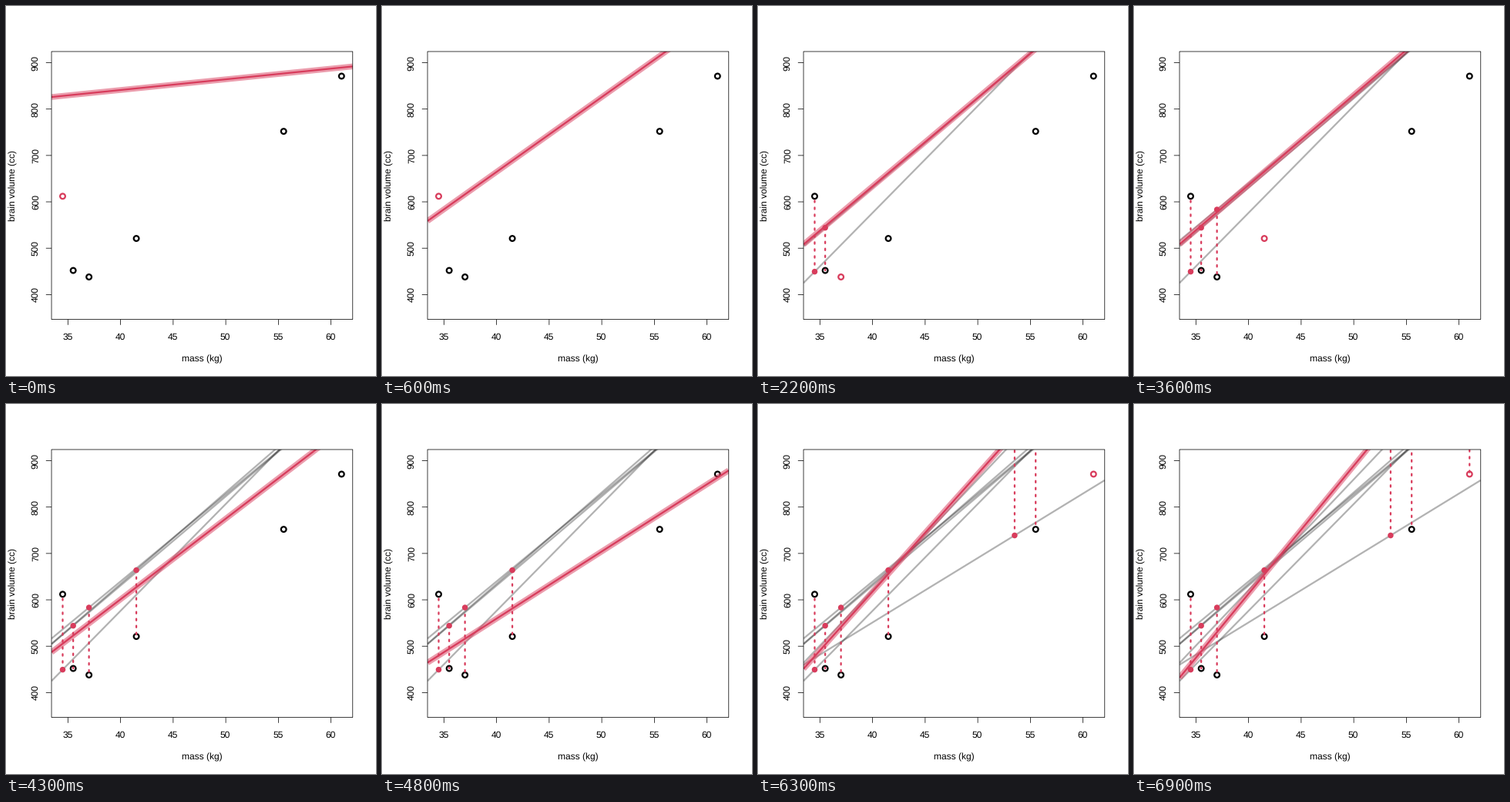
Write a matplotlib script that moves like this. It is 480 by 480 pixels and loops after 7 s.

```python
import matplotlib.pyplot as plt
from matplotlib.animation import FuncAnimation
from matplotlib.patches import Circle, Rectangle

plt.rcParams["font.family"] = "Liberation Sans"
plt.rcParams["text.hinting"] = "none"

SIZE, DPI = 480, 72            # at 72 dpi one point is one pixel
STAGE = 10                     # frames spent on each left-out observation
LEFT, RIGHT, TOP, BOTTOM = 59.04, 449.76, 59.04, 406.56
X0, X1 = 33.44, 62.06
Y0, Y1 = 346.5, 924.1
RED = "#D83C5C"
THIN, BOLD, WIDE = 0.75, 2.25, 7.5
DASH = 4 * BOLD                # length of one dash and its gap

MASS = [34.5, 35.5, 37, 41.5, 53.5, 55.5, 61]
BRAIN = [612, 452, 438, 521, 1350, 752, 871]

# (value at the left edge, slope): a flat start, then one fit per left-out point
FITS = [(870.5, 0), (425, 23.05), (504.5, 19.24), (516.5, 18.78),
        (505, 19.72), (460, 13.9), (464, 23.9), (432, 27.6)]


def px(x):
    return LEFT + (x - X0) / (X1 - X0) * (RIGHT - LEFT)


def py(y):
    return BOTTOM - (y - Y0) / (Y1 - Y0) * (BOTTOM - TOP)


def value(fit, x):
    return fit[0] + fit[1] * (x - X0)


def ends(fit):
    return [py(value(fit, X0)), py(value(fit, X1))]


fig = plt.figure(figsize=(SIZE / DPI, SIZE / DPI), dpi=DPI, facecolor="white")
ax = fig.add_axes([0, 0, 1, 1])
ax.set_xlim(0, SIZE)
ax.set_ylim(SIZE, 0)
ax.axis("off")

frame_box = Rectangle((LEFT, TOP), RIGHT - LEFT, BOTTOM - TOP, fill=False,
                      ec="black", lw=THIN, snap=False, zorder=8)
ax.add_patch(frame_box)


def clipped(artist):
    artist.set_clip_path(frame_box)
    return artist


def data_line(xs, ys, **style):
    line, = ax.plot(xs, ys, snap=False, **style)
    return clipped(line)


def fit_line(fit, **style):
    return data_line([LEFT, RIGHT], ends(fit), solid_capstyle="butt", **style)


def gap_line(x, guess, y):
    # dashes run from the guess; one above the stage moves in by whole dashes
    start = max(py(guess), py(guess) % DASH)
    return data_line([px(x)] * 2, [start, py(y)], color=RED, lw=BOLD,
                     ls=(0, (1, 3)), dash_capstyle="round", zorder=3)


def disc(x, y, r, **style):
    return clipped(ax.add_patch(Circle((px(x), py(y)), r, snap=False, **style)))


def tick(xs, ys):
    ax.plot(xs, ys, color="black", lw=THIN, snap=False, solid_capstyle="butt")


def label(x, y, text, rotation=0):
    ax.text(x, y, text, size=12, rotation=rotation, rotation_mode="anchor",
            ha="center", va="baseline")


def draw_axes():
    for x in range(35, 61, 5):
        tick([px(x)] * 2, [BOTTOM, BOTTOM + 7.2])
        label(px(x) - 0.5, 433, str(x))
    for y in range(400, 901, 100):
        tick([LEFT - 7.2, LEFT], [py(y)] * 2)
        label(41.8, py(y), str(y), 90)
    label((LEFT + RIGHT) / 2, 462, "mass (kg)")
    label(13, (TOP + BOTTOM) / 2, "brain volume (cc)", 90)


draw_axes()

circles, old_fits, gaps, dots = [], [], [], []
for x, y, fit in zip(MASS, BRAIN, FITS[1:]):
    guess = value(fit, x)
    circles.append(disc(x, y, 3.35, fill=False, lw=BOLD, zorder=1))
    old_fits.append(fit_line(fit, color="black", alpha=0.3, lw=BOLD, zorder=2))
    gaps.append(gap_line(x, guess, y))
    dots.append(disc(x, guess, 3.75, fc=RED, ec="none", zorder=4))

band = fit_line(FITS[0], color=RED, alpha=0.5, lw=WIDE, zorder=5)
fit_now = fit_line(FITS[0], color=RED, lw=BOLD, zorder=6)


def update(n):
    stage, step = divmod(n, STAGE)
    t = (step + 1) / STAGE
    fit = [a + (b - a) * t for a, b in zip(FITS[stage], FITS[stage + 1])]
    for line in (band, fit_now):
        line.set_ydata(ends(fit))

    for i in range(len(MASS)):
        # the prediction error shows once the new fit has settled
        known = i < stage or (i == stage and step == STAGE - 1)
        circles[i].set_edgecolor(RED if i == stage else "black")
        old_fits[i].set_visible(i < stage)
        gaps[i].set_visible(known)
        dots[i].set_visible(known)
    return []


anim = FuncAnimation(fig, update, frames=STAGE * len(MASS), interval=100,
                     repeat=True, blit=False)
plt.show()
```
